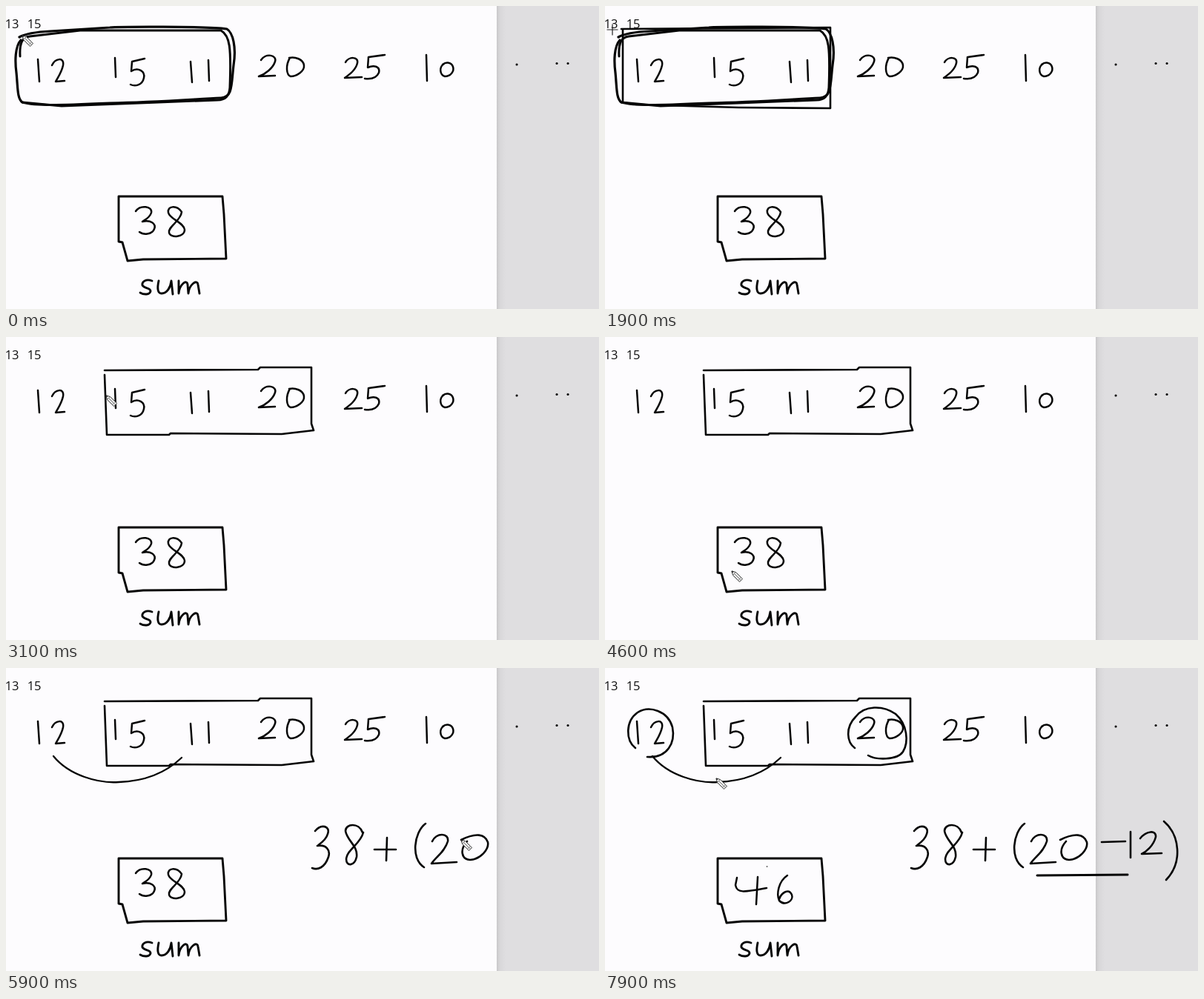
These frames come from a looping animation (800x409 px, 8 s). An HTML page:

```html
<!DOCTYPE html>
<html lang="en">
<head>
<meta charset="utf-8">
<title>Sliding window sum</title>
<style>
html, body { margin: 0; height: 100%; overflow: hidden; background: #fdfcfe; }
svg { display: block; width: 800px; height: 409px; }
.ink { fill: none; stroke: #050505; stroke-linecap: round; stroke-linejoin: round; }
text { font: 16.5px "Open Sans", "Noto Sans", sans-serif; text-anchor: end; fill: #111; }
</style>
</head>
<body>
<svg viewBox="0 0 800 409">
  <defs>
    <linearGradient id="edge">
      <stop offset="0" stop-color="#c9c8ca"/>
      <stop offset=".35" stop-color="#d8d7d9"/>
      <stop offset="1" stop-color="#dfdee0"/>
    </linearGradient>
  </defs>
  <rect width="800" height="409" fill="#fdfcfe"/>
  <rect x="662" width="138" height="409" fill="#dfdee0"/>
  <rect x="662" width="12" height="409" fill="url(#edge)"/>
  <g id="oldBox"></g>
  <text x="17.5" y="29.5">13</text>
  <text x="47.5" y="29.5">15</text>
  <g id="board"></g>
  <g id="pencil" stroke="#333" stroke-width="1" stroke-linejoin="round">
    <path d="M0,0 L1.5,5.5 L10.5,14.5 L14.5,10.5 L5.5,1.5 Z" fill="#f4f4f4"/>
    <path d="M1.5,5.5 L5.5,1.5 M3.5,3.5 L12.5,12.5 M8.5,12.5 L12.5,8.5" fill="none" stroke="#666"/>
    <path d="M0,0 L.6,2.2 L2.2,.6 Z" fill="#222"/>
  </g>
  <path id="cross" d="M-7.5,0 H7.5 M0,-7.5 V7.5" stroke="#222" stroke-width="1.2"/>
</svg>
<script>
const LOOP = 8000, STEP = 100, NEVER = LOOP + 1;
const $ = id => document.getElementById(id);
const strokes = [], covers = [];

function add(layer, tag, attrs) {
  const el = document.createElementNS("http://www.w3.org/2000/svg", tag);
  for (const k in attrs) el.setAttribute(k, attrs[k]);
  return $(layer).appendChild(el);
}

// A pen line that grows between start and end and vanishes at gone.
function pen(d, width = 2.5, start = -2, end = -1, gone = NEVER, layer = "board") {
  const el = add(layer, "path", { d, class: "ink", "stroke-width": width });
  const length = el.getTotalLength();
  el.setAttribute("stroke-dasharray", `${length} ${length + 20}`);
  strokes.push({ el, length, start, end, gone });
}

function erase(x, y, width, height, from) {
  covers.push({ el: add("oldBox", "rect", { x, y, width, height, fill: "#fdfcfe" }), from });
}

// First window and its erasure
const oldPen = (d, w, start, end) => pen(d, w, start, end, 2700, "oldBox");
oldPen("M20,46 C12,55 12,75 14,90 C16,110 15,125 22,130 C40,135 70,134 140,131 C200,130 250,126 290,124 C306,124 304,105 307,80 C311,55 306,36 298,31 C270,27 150,28 140,29 L60,34 C40,35 25,38 18,42", 3.2);
oldPen("M19,68 C18,50 22,42 32,41 L100,33 L290,33 C302,40 304,55 302,110 C301,122 296,127 285,127 L180,131 L75,135 L22,130", 3);
oldPen("M22,31 L304,29 V138 L180,137 L42,133 L24,130 V32", 2.6, 0, 600);
erase(0, 24, 320, 29, 2200);
erase(0, 112, 320, 30, 2400);
erase(0, 50, 34, 92, 2500);
erase(285, 50, 35, 92, 2600);

// Number row
[
  "M43,72 L45,102",
  "M62,80 C66,71 79,68 77,80 C75,90 70,96 67,102 L79,101",
  "M147,70 L148,96",
  "M187,71 L170,75 L169,88 C178,82 188,88 186,97 C184,107 174,109 168,106",
  "M249,75 L251,103", "M273,73 L274,101",
  "M344,73 C350,63 366,66 363,75 C360,84 350,92 341,95 L363,94",
  "M383,70 C377,80 378,93 384,95 C392,95 403,88 402,80 C401,72 390,68 382,70",
  "M458,76 C462,68 476,68 474,77 C472,86 464,92 457,97 L480,96",
  "M511,66 L489,69 L488,83 C497,79 505,82 503,90 C500,97 492,99 484,98",
  "M567,66 L568,101",
  "M591,78 C584,82 585,93 592,95 C600,95 605,88 603,82 C601,76 594,75 589,79"
].forEach(d => pen(d));
["M689,79 h.1", "M743,77.5 h.1", "M758,77.5 h.1"].forEach(d => pen(d, 3));

// Sum box and label
pen("M152,257 H292 L294,281 L297,341 L185,342 L164,344 L157,319 L152,318 Z", 2.9);
[
  "M197,371 C189,368 183,372 184,377 C187,382 195,380 195,385 C194,390 186,390 181,387",
  "M206,371 C204,380 204,388 210,388 C217,388 222,380 223,371 L225,389",
  "M233,371 V388 C234,376 244,368 245,376 L246,388 C247,376 258,368 259,376 L261,388"
].forEach(d => pen(d, 2.9));
pen("M175,277 C181,268 198,270 196,279 C194,286 187,289 184,291 C195,288 203,294 200,301 C197,309 185,309 180,305", 2.5, -2, -1, 7200);
pen("M237,278 C230,268 217,270 219,279 C221,288 240,292 241,302 C241,312 222,314 220,306 C218,298 236,290 237,278", 2.5, -2, -1, 7200);

// Second window and the arc
pen("M133,45 L340,44 L343,41 H412 V117 L415,126 L372,131 L222,130 L220,132 H136 L133,51", 2.6, 2700, 3050);
pen("M64,119 C85,145 125,156 152,154 C185,153 215,142 237,121", 2.3, 5100, 5300);

// 38 + (20 - 12)
[
  ["M417,220 C425,210 438,213 434,224 C432,232 424,237 420,240 C432,238 438,246 435,255 C430,270 420,273 413,270", 5300, 5400],
  ["M481,222 C476,208 458,210 458,220 C460,233 475,240 473,255 C470,268 459,268 459,258 C460,245 478,238 482,222", 5400, 5500],
  ["M497,245 H526", 5500, 5550],
  ["M514,229 L513,260", 5550, 5600],
  ["M566,210 C550,222 546,258 564,269", 5600, 5700],
  ["M575,234 C580,222 598,222 596,234 C592,248 580,255 574,264 L608,262", 5700, 5800],
  ["M622,234 C612,245 614,258 626,259 C640,258 652,245 650,235 C646,224 634,222 614,232", 5800, 5900],
  ["M670,235 L702,234", 6000, 6100],
  ["M709,221 V256", 6500, 6600],
  ["M722,230 C730,220 744,218 743,228 C740,240 730,248 724,251 L751,250", 6600, 6750],
  ["M754,207 C775,225 780,262 757,286", 6750, 6900]
].forEach(([d, a, b]) => pen(d, 2.6, a, b));
pen("M583,280 L705,279", 3, 7000, 7100);

// New sum and the two circled numbers
pen("M218.5,268 h.1", 1.5, 7190, 7195);
pen("M178,283 L176,293 C178,304 186,303 218,297", 2.5, 7200, 7300);
pen("M206,282 L204,319", 2.5, 7300, 7350);
pen("M246,280 C234,288 231,305 235,314 C243,322 255,314 252,306 C248,297 238,303 235,312", 2.5, 7350, 7500);
pen("M337,108 C326,100 324,80 338,66 C350,50 375,50 392,62 C408,76 410,100 402,113 C394,125 365,124 355,118", 2.6, 7500, 7700);
pen("M41,108 C28,98 27,72 44,60 C60,50 85,58 91,80 C95,100 85,122 57,120", 2.6, 7800, 7850);

// Pointer path: time, x, y
const route = [
  [0, 22, 40], [600, 24, 32], [800, 474, 62], [900, 278, 125], [1000, 150, 160],
  [1100, 30, 100], [1600, 210, 75], [1800, 210, 75], [1900, 10, 32], [2300, 296, 43],
  [2400, 316, 130], [2500, 30, 128], [2600, 300, 125], [2700, 133, 45],
  [3100, 135, 79], [3300, 360, 90], [3600, 200, 285], [3800, 118, 102],
  [4100, 171, 309], [4200, 171, 309], [4300, 171, 316], [4600, 171, 316],
  [4800, 320, 110], [5000, 59, 102], [5100, 64, 119], [5300, 237, 121],
  [5900, 611, 229], [6000, 630, 250], [6100, 702, 234], [6200, 600, 368],
  [6300, 70, 45], [6500, 709, 221], [6900, 757, 270], [7000, 780, 300],
  [7100, 705, 279], [7200, 178, 283], [7700, 355, 118], [7800, 58, 55],
  [7900, 150, 149], [LOOP, 150, 149]
];

function pointerAt(t) {
  const i = route.findIndex(r => r[0] > t);
  const [t0, x0, y0] = route[i - 1], [t1, x1, y1] = route[i];
  const p = (t - t0) / (t1 - t0);
  return [x0 + (x1 - x0) * p, y0 + (y1 - y0) * p];
}

const show = (el, on) => { el.style.visibility = on ? "visible" : "hidden"; };
const between = (t, a, b) => t >= a && t < b;

function draw(t) {
  let [x, y] = pointerAt(t);
  for (const s of strokes) {
    const p = Math.min(1, Math.max(0, (t - s.start) / (s.end - s.start)));
    show(s.el, p > 0 && t < s.gone);
    s.el.setAttribute("stroke-dashoffset", s.length * (1 - p));
    if (t > s.start && t <= s.end && s.end > 0) {
      const tip = s.el.getPointAtLength(s.length * p);
      [x, y] = [tip.x, tip.y];
    }
  }
  covers.forEach(c => show(c.el, t >= c.from));
  const crossOn = between(t, 1900, 2700);
  const away = between(t, 1200, 1600) || between(t, 1700, 1900);
  show($("cross"), crossOn);
  show($("pencil"), !crossOn && !away);
  for (const id of ["cross", "pencil"]) $(id).setAttribute("transform", `translate(${x} ${y})`);
}

const begin = performance.now();
let last = -1;
function tick() {
  const t = Math.floor(((performance.now() - begin) % LOOP) / STEP) * STEP;
  if (t !== last) draw(last = t);
  requestAnimationFrame(tick);
}
tick();
</script>
</body>
</html>
```
